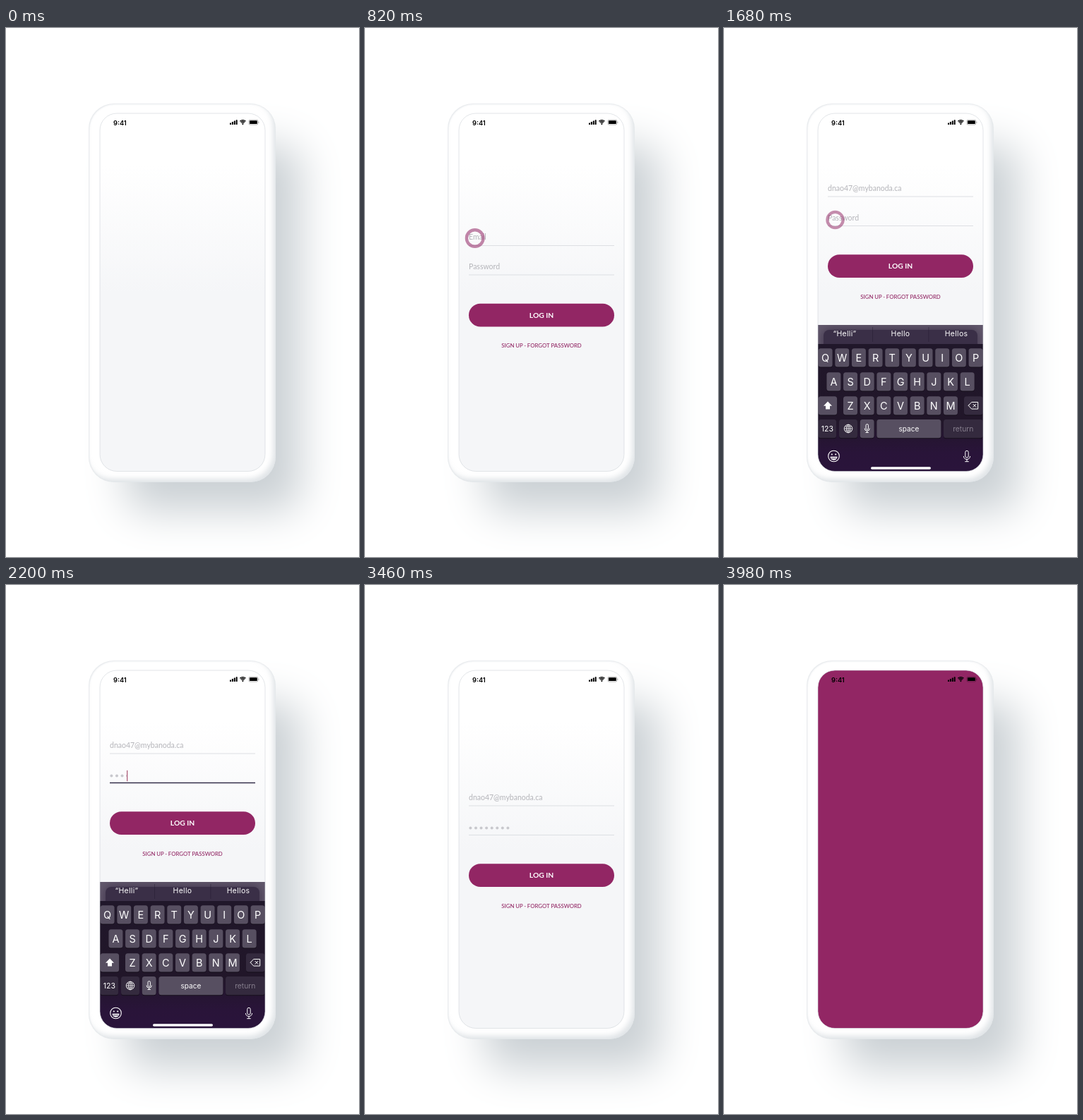
These frames come from a looping animation (500x750 px, 4340 ms). An HTML page with a canvas:

```html
<!DOCTYPE html>
<html lang="en">
<head>
<meta charset="utf-8">
<title>Log in</title>
<style>
  html, body { margin: 0; width: 100%; height: 100%; overflow: hidden; background: #fff; }
  .phone {
    position: absolute; left: 117px; top: 107px; width: 265px; height: 537px;
    border-radius: 36px; background: #fff;
    box-shadow: 44px 50px 60px -9px #cad0d4,
      inset -4px -5px 7px rgba(196, 204, 210, .5),
      inset 1px 1px 2px rgba(170, 180, 188, .3);
  }
  canvas { position: absolute; left: 0; top: 0; width: 500px; height: 750px; }
</style>
</head>
<body>
<div class="phone"></div>
<canvas id="stage"></canvas>
<script>
const LOOP = 4340;
const STEP = 20;
const PLUM = '#922664';
const HINT = '#b4b4b9';
const FORM_FONT = 'Lato, sans-serif';
const UI_FONT = 'Inter, sans-serif';
const EMAIL = 'dnao47@mybanoda.ca';
const SCREEN = { x: 133, y: 121, w: 234, h: 507.5, r: 24 };

// Start times of the phases, in ms.
const TAP_MAIL = 600, TAP_PASS = 1580, TAP_LOGIN = 3060;
const TAP_HOLD = 120, TAP_RELEASE = 220, MOVE = 200;
const FOCUS_MAIL = TAP_MAIL + TAP_RELEASE;
const FOCUS_PASS = TAP_PASS + TAP_RELEASE;
const TYPE_MAIL = FOCUS_MAIL + MOVE;
const TYPE_PASS = FOCUS_PASS + MOVE;
const TYPE_TIME = 520;
const CLOSE = 2680, FILL = 3780;

const canvas = document.getElementById('stage');
const ctx = canvas.getContext('2d');
const dpr = window.devicePixelRatio || 1;
canvas.width = 500 * dpr;
canvas.height = 750 * dpr;
ctx.scale(dpr, dpr);

const clamp = v => Math.max(0, Math.min(1, v));
const span = (t, a, b) => clamp((t - a) / (b - a));
const smooth = p => p * p * (3 - 2 * p);
const ease = (t, a, b) => smooth(span(t, a, b));
const easeOut = p => 1 - (1 - p) ** 2;
const mix = (a, b, p) => a + (b - a) * p;

function box(x, y, w, h, r, fill) {
  ctx.beginPath();
  ctx.roundRect(x, y, w, h, r);
  ctx.fillStyle = fill;
  ctx.fill();
}

function text(str, x, y, font, fill, align = 'left', spacing = 0) {
  ctx.font = font;
  ctx.fillStyle = fill;
  ctx.textAlign = align;
  ctx.letterSpacing = spacing + 'px';
  ctx.fillText(str, x, y);
  ctx.letterSpacing = '0px';
}

function line(points, width, color) {
  ctx.beginPath();
  points.forEach(([x, y], i) => i ? ctx.lineTo(x, y) : ctx.moveTo(x, y));
  ctx.lineWidth = width;
  ctx.strokeStyle = color;
  ctx.stroke();
}

function arc(x, y, r, a, b, width, color) {
  ctx.beginPath();
  ctx.arc(x, y, r, a, b);
  ctx.lineWidth = width;
  ctx.strokeStyle = color;
  ctx.stroke();
}

function dot(x, y, r, color) {
  ctx.beginPath();
  ctx.arc(x, y, r, 0, Math.PI * 2);
  ctx.fillStyle = color;
  ctx.fill();
}

function drawBackground() {
  const g = ctx.createLinearGradient(0, 195, 0, 375);
  g.addColorStop(0, '#ffffff');
  g.addColorStop(1, '#f5f6f8');
  ctx.fillStyle = g;
  ctx.fillRect(SCREEN.x, SCREEN.y, SCREEN.w, SCREEN.h);
}

function drawStatus() {
  text('9:41', 152, 138.2, '600 9.3px ' + UI_FONT, '#000');
  for (let i = 0; i < 4; i++) {
    const h = 2.6 + i * 1.4;
    box(317 + i * 2.9, 137 - h, 2, h, 0.5, '#000');
  }
  const up = -Math.PI / 2;
  for (const r of [2.6, 4.3, 6]) arc(335.4, 136.6, r, up - 0.75, up + 0.75, 1.2, '#000');
  dot(335.4, 136.2, 1, '#000');
  ctx.beginPath();
  ctx.roundRect(343.9, 130.3, 13, 6.8, 1.8);
  ctx.lineWidth = 0.7;
  ctx.strokeStyle = 'rgba(0,0,0,.4)';
  ctx.stroke();
  box(345, 131.3, 10.8, 4.8, 0.9, '#000');
  box(357.5, 132.6, 0.8, 2.2, 0.4, 'rgba(0,0,0,.4)');
}

function underline(y, active) {
  ctx.fillStyle = '#dddfe3';
  ctx.fillRect(147, y - 0.5, 206, 1);
  if (active > 0) {
    ctx.save();
    ctx.globalAlpha *= active;
    ctx.fillStyle = '#2b2440';
    ctx.fillRect(147, y - 0.7, 206, 1.4);
    ctx.restore();
  }
}

// Wipes the content in behind the caret: a short first move, then the rest.
function typed(t, start, y, width, draw) {
  const end = start + TYPE_TIME;
  const first = 24.5;
  const w = first * ease(t, start, start + MOVE)
    + (width - first) * ease(t, start + MOVE, end);
  ctx.save();
  ctx.beginPath();
  ctx.rect(140, y - 12, 7 + w, 24);
  ctx.clip();
  draw();
  ctx.restore();
  if (t > start && t < end) {
    ctx.fillStyle = '#b0607c';
    ctx.fillRect(146.5 + w, y - 7.7, 1.3, 15.5);
  }
}

function hint(t, str, y, focus, font) {
  ctx.save();
  ctx.globalAlpha *= 1 - ease(t, focus, focus + MOVE);
  text(str, 147, y, font, HINT);
  ctx.restore();
}

function focused(t, focus, typeStart) {
  const end = typeStart + TYPE_TIME;
  return ease(t, focus, focus + MOVE) * (1 - span(t, end - 60, end + 20));
}

function drawForm(t, dy) {
  const shown = span(t, 0, 180);
  const font = '10.5px ' + FORM_FONT;

  ctx.save();
  ctx.globalAlpha = shown;
  ctx.translate(0, dy + 28 * (1 - easeOut(shown)));

  hint(t, 'Email', 300.2, FOCUS_MAIL, font);
  typed(t, TYPE_MAIL, 296.7, 105, () => text(EMAIL, 147, 300.2, font, HINT));
  underline(308.5, focused(t, FOCUS_MAIL, TYPE_MAIL));

  hint(t, 'Password', 342.4, FOCUS_PASS, font);
  typed(t, TYPE_PASS, 340, 58, () => {
    for (let i = 0; i < 8; i++) dot(149.4 + i * 7.57, 340, 2, '#c8c8cd');
  });
  underline(350, focused(t, FOCUS_PASS, TYPE_PASS));

  text('SIGN UP · FORGOT PASSWORD', 250, 453.2, '500 7.8px ' + FORM_FONT, PLUM, 'center');
  ctx.restore();

  drawButton(t, dy, shown);
}

function drawButton(t, dy, shown) {
  const grow = ease(t, FILL, FILL + MOVE);
  const y = 390.8 + dy + 28 * (1 - easeOut(shown));
  ctx.save();
  ctx.globalAlpha = shown;
  box(mix(147, SCREEN.x, grow), mix(y, SCREEN.y, grow), mix(206, SCREEN.w, grow),
    mix(32.8, SCREEN.h, grow), mix(16.4, SCREEN.r, grow), PLUM);
  ctx.globalAlpha = shown * (1 - ease(t, 3500, 3660));
  text('LOG IN', 250, y + 19.9, '700 10.3px ' + FORM_FONT, '#fff', 'center');
  ctx.restore();
}

// A tap grows in, rests, then widens while it fades.
function drawTap(t, x, y, start) {
  const release = start + TAP_RELEASE;
  const grow = ease(t, start - STEP, start + TAP_HOLD);
  const fade = ease(t, release, release + MOVE - STEP);
  if (grow === 0 || fade === 1) return;
  const r = 14 * grow + 3 * fade;
  ctx.save();
  ctx.globalAlpha = 0.55 * grow * (1 - fade);
  arc(x, y, r - 2.2 * grow, 0, Math.PI * 2, 4.4 * grow, PLUM);
  ctx.restore();
}

const LIGHT_KEY = '#574f61';
const DARK_KEY = '#342a3e';

function key(x, y, w, fill, label, size = 14.5, color = '#fff') {
  box(x, y + 1, w, 26.2, 3.5, '#150e1b');
  box(x, y, w, 26.2, 3.5, fill);
  if (label) text(label, x + w / 2, y + 13.1 + size * 0.36, `${size}px ${UI_FONT}`, color, 'center');
}

function keyRow(letters, x, y) {
  [...letters].forEach((c, i) => key(x + i * 23.66, y, 20, LIGHT_KEY, c));
}

function mic(x, y, s) {
  ctx.beginPath();
  ctx.roundRect(x - 2 * s, y - 7 * s, 4 * s, 9 * s, 2 * s);
  ctx.lineWidth = 1;
  ctx.strokeStyle = '#fff';
  ctx.stroke();
  arc(x, y, 4.2 * s, 0, Math.PI, 1, '#fff');
  line([[x, y + 4.2 * s], [x, y + 7 * s]], 1, '#fff');
  line([[x - 2.5 * s, y + 7 * s], [x + 2.5 * s, y + 7 * s]], 1, '#fff');
}

function globe(x, y) {
  const r = 5.8;
  arc(x, y, r, 0, Math.PI * 2, 0.8, '#fff');
  ctx.beginPath();
  ctx.ellipse(x, y, 2.6, r, 0, 0, Math.PI * 2);
  ctx.stroke();
  line([[x - r, y], [x + r, y]], 0.8, '#fff');
  line([[x, y - r], [x, y + r]], 0.8, '#fff');
  for (const d of [-3, 3]) line([[x - 5, y + d], [x + 5, y + d]], 0.7, '#fff');
}

function shiftIcon(x, y) {
  ctx.beginPath();
  const pts = [[0, -6], [6, 0.3], [3, 0.3], [3, 5], [-3, 5], [-3, 0.3], [-6, 0.3]];
  pts.forEach(([a, b]) => ctx.lineTo(x + a, y + b));
  ctx.closePath();
  ctx.fillStyle = '#fff';
  ctx.fill();
}

function deleteIcon(x, y) {
  line([[x - 7, y], [x - 2.5, y - 4.8], [x + 6.5, y - 4.8], [x + 6.5, y + 4.8],
    [x - 2.5, y + 4.8], [x - 7, y], [x - 6, y - 1]], 1, '#fff');
  line([[x - 0.5, y - 2.3], [x + 4, y + 2.3]], 1, '#fff');
  line([[x - 0.5, y + 2.3], [x + 4, y - 2.3]], 1, '#fff');
}

function smiley(x, y) {
  arc(x, y, 7.8, 0, Math.PI * 2, 1.1, '#fff');
  dot(x - 2.7, y - 2.5, 1.1, '#fff');
  dot(x + 2.7, y - 2.5, 1.1, '#fff');
  ctx.beginPath();
  ctx.arc(x, y + 0.8, 5, 0, Math.PI);
  ctx.closePath();
  ctx.fillStyle = '#fff';
  ctx.fill();
  line([[x - 3.8, y + 2.9], [x + 3.8, y + 2.9]], 0.9, '#2a143b');
}

function drawSuggestions() {
  ctx.save();
  ctx.beginPath();
  ctx.rect(133, 421, 234, 27);
  ctx.clip();
  ctx.fillStyle = '#62586c';
  ctx.fillRect(133, 421, 234, 27);
  ctx.shadowColor = '#3a2f47';
  ctx.shadowBlur = 14 * dpr;
  box(141, 428, 218, 40, 8, '#3a2f47');
  ctx.restore();
  ctx.fillStyle = 'rgba(30,20,40,.45)';
  for (const x of [210, 289.5]) ctx.fillRect(x, 424, 0.8, 21);
  const words = ['“Helli”', 'Hello', 'Hellos'];
  words.forEach((w, i) => text(w, 171 + i * 79, 437.3, '10.5px ' + UI_FONT, '#fff', 'center', 0.3));
}

function drawKeyboard(dy) {
  if (dy > 208) return;
  ctx.save();
  ctx.translate(0, dy);
  const g = ctx.createLinearGradient(0, 448, 0, 629);
  g.addColorStop(0, '#20172a');
  g.addColorStop(0.6, '#211629');
  g.addColorStop(0.85, '#291439');
  g.addColorStop(1, '#2a143b');
  ctx.fillStyle = g;
  ctx.fillRect(133, 447, 234, 183);
  drawSuggestions();

  keyRow('QWERTYUIOP', 133.6, 454.2);
  keyRow('ASDFGHJKL', 145.4, 488.2);
  keyRow('ZXCVBNM', 169, 522.2);
  key(133.6, 522.2, 26.5, LIGHT_KEY);
  shiftIcon(147, 535.4);
  key(340, 522.2, 26.5, DARK_KEY);
  deleteIcon(353.2, 535.3);

  key(133.6, 555, 25.5, DARK_KEY, '123', 10.5);
  key(163, 555, 26, DARK_KEY);
  globe(176, 568);
  key(192.8, 555, 19.8, LIGHT_KEY);
  mic(202.7, 567.6, 0.85);
  key(216.4, 555, 91, LIGHT_KEY, 'space', 10);
  key(311, 555, 55.6, DARK_KEY, 'return', 10.3, '#857d8c');

  smiley(155.5, 607);
  mic(344, 607, 1.1);
  box(208, 622.3, 85, 3.4, 1.7, '#fff');
  ctx.restore();
}

function render(t) {
  ctx.clearRect(0, 0, 500, 750);
  const open = ease(t, FOCUS_MAIL, FOCUS_MAIL + MOVE);
  const close = ease(t, CLOSE, CLOSE + MOVE);
  const dy = mix(-69.5 * open, 4.5, close);

  ctx.save();
  ctx.beginPath();
  ctx.roundRect(SCREEN.x, SCREEN.y, SCREEN.w, SCREEN.h, SCREEN.r);
  ctx.clip();
  drawBackground();
  drawForm(t, dy);
  drawKeyboard(283 * (1 - open + close));
  drawTap(t, 155.7, 298, TAP_MAIL);
  drawTap(t, 157.5, 272, TAP_PASS);
  drawTap(t, 250, 397, TAP_LOGIN);
  drawStatus();
  ctx.restore();

  ctx.beginPath();
  ctx.roundRect(SCREEN.x, SCREEN.y, SCREEN.w, SCREEN.h, SCREEN.r);
  ctx.lineWidth = 0.9;
  ctx.strokeStyle = 'rgba(205,210,216,.65)';
  ctx.stroke();
}

const began = performance.now();
function tick() {
  const t = (performance.now() - began + 1) % LOOP;
  render(Math.floor(t / STEP) * STEP);
  requestAnimationFrame(tick);
}
tick();
</script>
</body>
</html>
```
